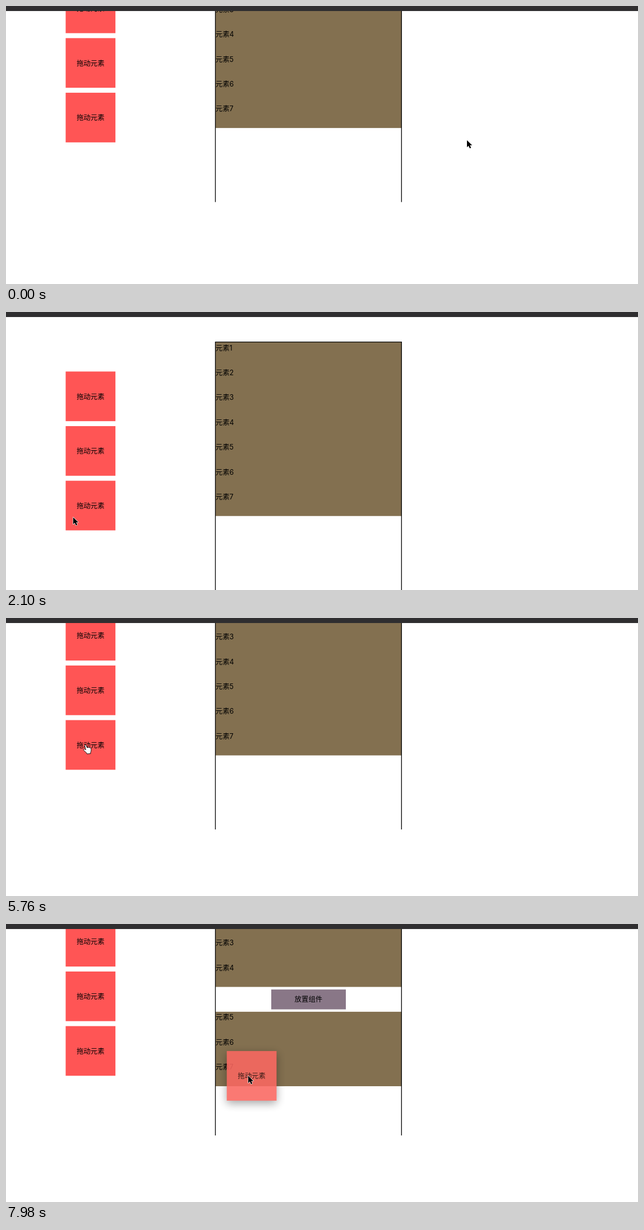
These frames come from a looping animation (1127 px wide and 497 px high, 8000 ms). An HTML page:

```html
<!DOCTYPE html>
<html lang="zh-CN">
<head>
<meta charset="utf-8">
<title>拖动元素</title>
<style>
  html, body { margin: 0; width: 100%; height: 100%; overflow: hidden; background: #fff; }
  svg { display: block; width: 1127px; height: 497px; }
  text { font: 12.425px Inter, "Noto Sans CJK SC", "Noto Sans CJK", sans-serif; }
  .mid { text-anchor: middle; }
  .source { fill: #ff5555; }
  #ghost { opacity: .88; filter: drop-shadow(0 5px 8px rgba(0, 0, 0, .4)); }
  #ghost .source { fill: #fa6760; }
  #ghost text { fill: #2c100e; }
</style>
</head>
<body>
<svg viewBox="0 0 1127 497">
  <rect width="1127" height="497" fill="#fff"/>
  <g id="page">
    <g id="sources"></g>
    <rect id="list" x="373.5" y="54.1" width="331.5" fill="#837050"/>
    <g id="items"></g>
    <g id="slot">
      <rect x="373.5" width="331.5" height="44.375" fill="#fff"/>
      <rect x="473" y="4.6" width="133" height="35.5" fill="#897787"/>
      <text class="mid" x="539.4" y="26.9">放置组件</text>
    </g>
    <path d="M373.4 497V53.6H705.3V497" fill="none" stroke="#000" stroke-width="1.3"/>
  </g>
  <g id="ghost"></g>
  <rect width="1127" height="9" fill="#2f2e30"/>
  <path id="arrow" d="M0 0V12.6L2.9 9.9L5 14.6L7.3 13.6L5.3 9.1H9.2Z" fill="#000"
        stroke="#fff" stroke-width="1.2" paint-order="stroke" stroke-linejoin="round"/>
  <path id="hand" d="M-3.6 1.4C-4 -.2 -1.9 -.9 -1.2 .7L.9 5.2C1.1 4.1 2.8 3.9 3.2 5C3.8 4 5.2 4.2 5.5 5.3C6.3 4.7 7.4 5.2 7.5 6.3C8 8.6 8 11 6.8 13.3L6.9 15.4L.3 16L-.2 14.3C-2 13 -3.8 10.8 -5.7 9.1C-6.6 8 -5.1 6.7 -3.8 7.4L-1.7 8.7Z"
        fill="#fff" stroke="#111" stroke-linejoin="round"/>
</svg>
<script>
const LOOP = 8000, STEP = 60, ROW = 44.375, BOX = 88.75, LIST_TOP = 54.1;
const $ = id => document.getElementById(id);

const sourceBox = (x, y) =>
  `<rect class="source" x="${x}" y="${y}" width="${BOX}" height="${BOX}"/>` +
  `<text class="mid" x="${x + BOX / 2}" y="${y + 49.1}">拖动元素</text>`;

$('sources').innerHTML = [0, 1, 2].map(i => sourceBox(106.4, 106.4 + i * BOX * 1.1)).join('');
$('ghost').innerHTML = sourceBox(0, 0);
$('items').innerHTML = [1, 2, 3, 4, 5, 6, 7].map(n => `<text x="373.8" y="68.7">元素${n}</text>`).join('');
const items = [...$('items').children];

const BOTTOM = 146.6;
const flicks = [{ at: 360, to: 0 }, { at: 780, to: BOTTOM }, { at: 1140, to: 0 },
  { at: 3720, to: 4 }, { at: 4020, to: 119.1 }];

// Each sweep bends from the previous resting point, past `via`, to `to`
const home = [822, 240];
const sweeps = [
  { from: 1500, until: 2340, via: [-8, 619], to: [140, 250] },
  { from: 2340, until: 2700, via: [141, 48], to: [140, 329] },
  { from: 2880, until: 3360, via: [138, 100], to: [158, 173] },
  { from: 3360, until: 3600, via: [490, 190], to: [330, 177] },
  { from: 4140, until: 4800, via: [170, 170], to: [161, 226] },
  { from: 4800, until: 5340, via: [150, 229], to: [144, 227] },
  { from: 6060, until: 6780, via: [632, 78], to: [351, 198.6] },
  { from: 6780, until: 7740, via: [28, 270], to: [484, 187] },
  { from: 7740, until: 7980, via: [470, 240], to: [432, 271.6] },
];

const lerp = (a, b, u) => a + (b - a) * u;
const smooth = u => u * u * (3 - 2 * u);

// A flick covers about a quarter of its way in the first step, the rest in the second
const scrollAt = t => flicks.reduce((y, f) =>
  t < f.at ? y : lerp(y, f.to, t < f.at + STEP ? .237 : 1), BOTTOM);

const pointerAt = t => sweeps.reduce((p, s) => {
  if (t < s.from) return p;
  const u = smooth(Math.min(1, (t - s.from) / (s.until - s.from)));
  return p.map((v, k) => lerp(lerp(v, s.via[k], u), lerp(s.via[k], s.to[k], u), u));
}, home);

const move = (el, x, y) => el.setAttribute('transform', `translate(${x.toFixed(2)} ${y.toFixed(2)})`);
const show = (el, on) => el.setAttribute('visibility', on ? 'visible' : 'hidden');

function render(time) {
  const t = Math.floor((time % LOOP) / STEP) * STEP;
  const slot = t < 6480 ? 0 : t < 7500 ? 3 : 4;
  const pressed = t >= 5760 && t < 5940;
  const [x, y] = pointerAt(t);

  move($('page'), 0, -scrollAt(t));
  $('list').setAttribute('height', ROW * (items.length + (slot ? 1 : 0)));
  items.forEach((el, i) => move(el, 0, ROW * (slot && i >= slot ? i + 1 : i)));
  show($('slot'), slot);
  move($('slot'), 0, LIST_TOP + ROW * slot);

  show($('ghost'), t >= 6120);
  move($('ghost'), x - 38.3, y - 44.5);
  show($('arrow'), !pressed);
  show($('hand'), pressed);
  move($('arrow'), x, y);
  move($('hand'), x, y);
}

const start = performance.now();
function tick() {
  render(performance.now() - start);
  requestAnimationFrame(tick);
}
tick();
</script>
</body>
</html>
```
